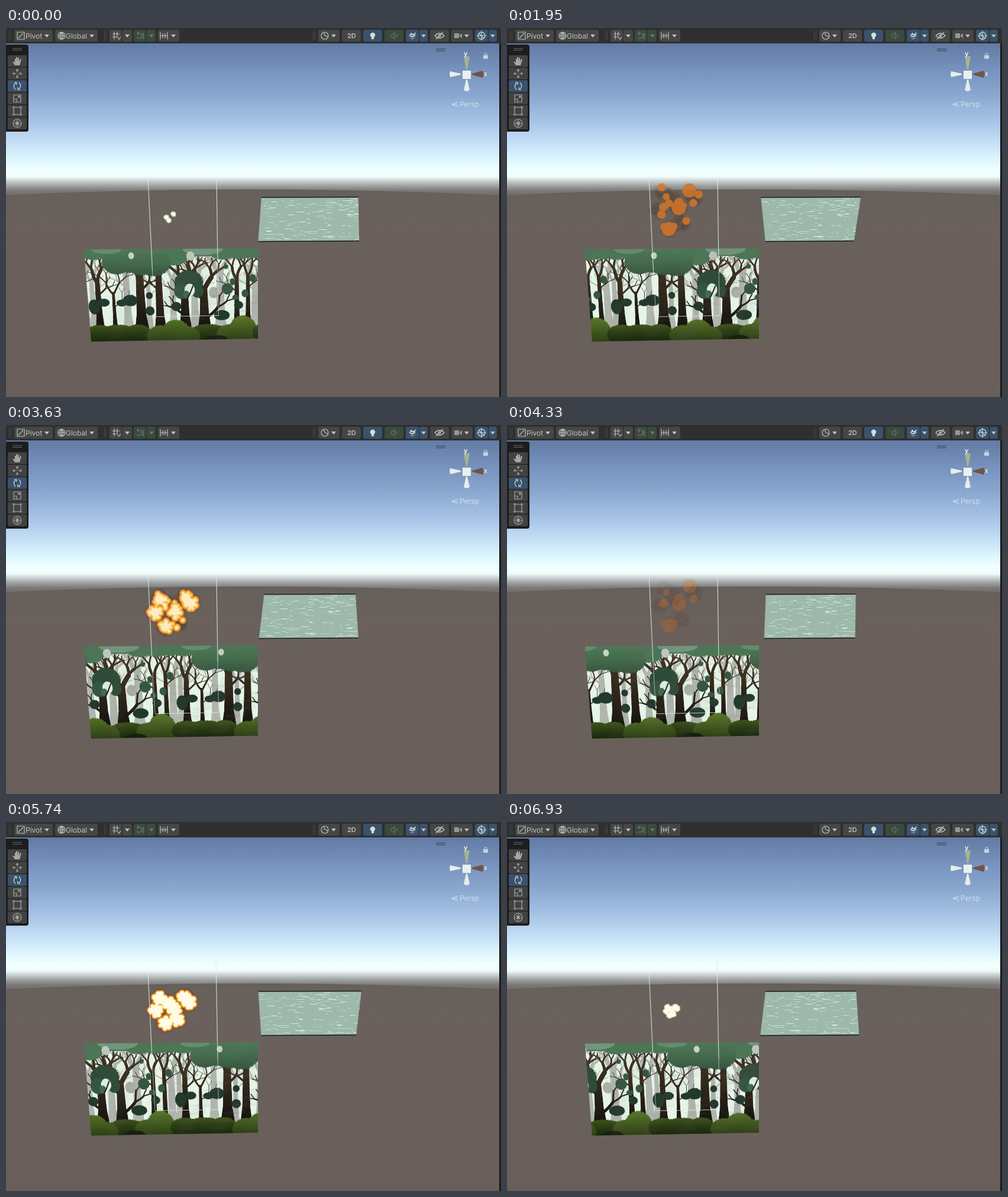
These frames come from a looping animation (837x623 px, 7000 ms). An HTML page with a canvas:

```html
<!DOCTYPE html>
<html lang="en">
<head>
<meta charset="utf-8">
<title>Scene view</title>
<style>
  html, body { margin: 0; width: 100%; height: 100%; overflow: hidden; background: #1f1f1f; }
  canvas { display: block; }
</style>
</head>
<body>
<canvas id="stage" width="837" height="623"></canvas>
<script>
const STEP = 70, STEPS = 100, LOOP = STEP * STEPS;
const BLAST = 2290, TAU = Math.PI * 2;
const TILE_W = 290, TILE_H = 155, SS = 2;
const stage = document.getElementById('stage').getContext('2d');

let seed = 1;
function rand() {
  seed = (seed * 1664525 + 1013904223) >>> 0;
  return seed / 4294967296;
}
const clamp = (v) => Math.max(0, Math.min(1, v));
const lerp = (a, b, k) => a + (b - a) * k;
const mix = (a, b, k) => `rgb(${a.map((v, i) => Math.round(lerp(v, b[i], k)))})`;

function makeCanvas(w, h) {
  const c = document.createElement('canvas');
  c.width = w;
  c.height = h;
  return c;
}
function gradient(c, y0, y1, stops) {
  const g = c.createLinearGradient(0, y0, 0, y1);
  stops.forEach(([y, color]) => g.addColorStop((y - y0) / (y1 - y0), color));
  return g;
}
function poly(c, color, points) {
  c.fillStyle = color;
  c.beginPath();
  points.forEach(([x, y]) => c.lineTo(x, y));
  c.closePath();
  c.fill();
}
function line(c, color, width, ...points) {
  c.strokeStyle = color;
  c.lineWidth = width;
  c.beginPath();
  points.forEach(([x, y]) => c.lineTo(x, y));
  c.stroke();
}

// ---------- editor frame and sky ----------
const INK = '#bcc4bc', BUTTON = '#464646', ACTIVE = '#3a526c', MUTED = '#3a4a3e';

function box(c, x, y, w, h, color, r = 3) {
  c.fillStyle = color;
  c.beginPath();
  c.roundRect(x, y, w, h, r);
  c.fill();
}
function icon(c, x, y, d, color = INK, fill = false) {
  c.save();
  c.translate(x, y);
  c.strokeStyle = c.fillStyle = color;
  c.lineWidth = 1.2;
  const path = new Path2D(d);
  fill ? c.fill(path) : c.stroke(path);
  c.restore();
}
const arrowDown = (c, x, color = INK) => icon(c, x, 13, 'M-4-2H4L0 3Z', color, true);
function label(c, text, x, y, font = '12px Inter, sans-serif', color = INK) {
  c.font = font;
  c.fillStyle = color;
  c.fillText(text, x, y);
}

function paintSky(c) {
  c.fillStyle = gradient(c, 26, 290, [[26, '#627ba4'], [70, '#7692bd'], [115, '#8ba8d0'], [155, '#a5c2e5'],
    [190, '#c1dcf4'], [220, '#dcf5fd'], [240, '#f0ffff'], [251, '#effcfb'], [257, '#cfd9d8'],
    [266, '#a0a4a3'], [275, '#7b7977'], [290, '#6a625e']]);
  c.fillRect(0, 26, 834, 264);
  c.fillStyle = gradient(c, 270, 623, [[270, '#645f5d'], [284, '#68605c'], [330, '#6a615c'], [623, '#685f5a']]);
  c.beginPath();
  c.moveTo(0, 282);
  c.quadraticCurveTo(410, 263, 834, 282);
  c.lineTo(834, 623);
  c.lineTo(0, 623);
  c.fill();
  c.fillStyle = '#1d1d1d';
  c.fillRect(834, 26, 3, 597);
}

function paintToolbar(c) {
  c.fillStyle = '#2f2f2f';
  c.fillRect(0, 0, 837, 26);
  [5, 166, 519].forEach((x) => {
    line(c, '#4a4a4a', 1, [x + .5, 5], [x + .5, 21]);
    line(c, '#4a4a4a', 1, [x + 3.5, 5], [x + 3.5, 21]);
  });
  [[14, 65], [83, 72], [175, 21], [197, 16], [216, 21, MUTED], [238, 15, MUTED], [257, 36], [528, 36],
    [568, 32], [604, 32, ACTIVE], [640, 32, MUTED], [676, 22, ACTIVE], [699, 14, ACTIVE], [717, 32],
    [753, 36], [793, 22, ACTIVE], [816, 14, ACTIVE]]
    .forEach(([x, w, color = BUTTON]) => box(c, x, 3, w, 20, color));
  [69, 145, 205, 283, 554, 706, 779, 823].forEach((x) => arrowDown(c, x));
  arrowDown(c, 246, '#6d776d');
  label(c, 'Pivot', 33, 17.5);
  label(c, 'Global', 101, 17.5);
  label(c, '2D', 577, 17, '600 11px Inter, sans-serif');

  icon(c, 25, 13, 'M-6-6H6V6H-6ZM-4 4L4-4');
  icon(c, 94, 13, 'M-6 0A6 6 0 1 0 6 0A6 6 0 1 0-6 0M-6 0H6M0-6V6M0-6Q-6 0 0 6M0-6Q6 0 0 6');
  icon(c, 186, 13, 'M-6-3H6M-6 2H2M-3-7V6M2-7V1M2 2L5 6L8 2');
  icon(c, 227, 13, 'M-6-4H-1M-6 4H-1M-1-4A4 4 0 0 1-1 4M-4-7V-1M5-5V6', '#748074');
  icon(c, 267, 13, 'M-6-6V6M6-6V6M-2-4V4M2-4V4M-6 0H6');
  icon(c, 539, 13, 'M-6 0A6 6 0 1 0 6 0A6 6 0 1 0-6 0M-1-5A5 5 0 0 0 5 1');
  icon(c, 620, 13, 'M-2 6V3Q-5 0-4-3Q0-8 4-3Q5 0 2 3V6Z', '#d4ddd5', true);
  icon(c, 656, 13, 'M-5-2H-3L1-5V5L-3 2H-5ZM3-2L6 2M6-2L3 2', '#667166');
  icon(c, 687, 13, 'M-6 0L0 3L6 0L4-1L0 1L-4-1ZM-6 3L0 6L6 3L0 5ZM-5-2L-1-5L1-2L6-6L4 0Z', '#d4ddd5', true);
  icon(c, 733, 13, 'M-8 0Q0-8 8 0Q0 8-8 0M-2 0A2 2 0 1 0 2 0A2 2 0 1 0-2 0M-6 6L6-6');
  icon(c, 764, 13, 'M-6-4H2V4H-6ZM3-1L7-4V4L3 1Z', '#929b92', true);
  icon(c, 804, 13, 'M-6 0A6 6 0 1 0 6 0A6 6 0 1 0-6 0M-8 0H8M0-8V8M-4-4Q0 2 4 4', '#d4ddd5');
}

function paintPalette(c) {
  box(c, -4, 28, 42, 147, '#1d1d1d', 4);
  [34.5, 37.5].forEach((y) => line(c, '#666', 1, [11, y], [27, y]));
  const tools = [
    'M-4 7L-8 1L-5 1L-4 3V-4H-2V0V-7H0V0L1-6H3V1L5-4L7-3L4 7Z',
    'M-7 0H-2M2 0H7M0-7V-2M0 2V7M-5-2L-7 0L-5 2M5-2L7 0L5 2M-2-5L0-7L2-5M-2 5L0 7L2 5',
    'M-3 6Q-9 0-2-6M-5-6H-1V-2M3-6Q9 0 2 6M5 6H1V2',
    'M-6-6H6V6H-6ZM-6 1H-1V6M1-1L4-4M1-4H4V-1',
    'M-4-6H4M-4 6H4M-6-4V4M6-4V4M-7-7H-5V-5H-7ZM5-7H7V-5H5ZM-7 5H-5V7H-7ZM5 5H7V7H5Z',
    'M-7 0A7 7 0 1 0 7 0A7 7 0 1 0-7 0M-6 0H6M0-6V6M-3-3L3 3M-3 3L3-3'];
  tools.forEach((d, i) => {
    box(c, 3, 46 + 21 * i, 32, 20, i === 2 ? ACTIVE : '#424242', 2);
    icon(c, 19, 56 + 21 * i, d, i === 2 ? '#d4ddd5' : '#a3aaa3', i === 0);
  });
}

function paintAxes(c) {
  [35.5, 38.5].forEach((y) => line(c, '#34404f', 1, [727, y], [743, y]));
  poly(c, '#a3b48f', [[774, 48], [784, 48], [780, 70], [778, 70]]);
  poly(c, '#e6eeea', [[778, 87], [780, 87], [784, 105], [779, 107], [774, 105]]);
  poly(c, '#e6eeea', [[769, 77], [769, 79], [751, 83], [750, 78], [751, 73]]);
  poly(c, '#745347', [[788, 77], [788, 79], [806, 84], [808, 78], [806, 72]]);
  poly(c, '#e9f1ee', [[772, 72], [786, 72], [786, 86], [772, 86]]);
  label(c, 'y', 774, 47, '600 11px Inter, sans-serif', '#f2f7f5');
  label(c, 'x', 808, 81, '600 10px Inter, sans-serif', '#e4ecea');
  box(c, 807, 46, 8, 6, '#c4d2dc', 1);
  icon(c, 811, 46, 'M-2 0V-2Q0-5 2-2V0', '#c4d2dc');
  icon(c, 759, 129, 'M5-4L-5 0L5 4M-5 0H5', '#cbdcec');
  label(c, 'Persp', 767, 133, '12px Inter, sans-serif', '#d0dfec');
}

// ---------- forest tile, two repeats wide ----------
function blob(c, x, y, rx, ry, color) {
  const n = Math.max(18, Math.round((rx + ry) * .9));
  poly(c, color, Array.from({ length: n * 2 }, (_, i) => {
    const a = i / n * Math.PI, r = i % 2 ? 1 : .9 + rand() * .06;
    return [x + Math.cos(a) * rx * r, y + Math.sin(a) * ry * r];
  }));
}
function limb(c, x, y, angle, len, width, depth) {
  const x2 = x + Math.sin(angle) * len, y2 = y - Math.cos(angle) * len;
  const bend = (rand() - .5) * len * .4;
  c.lineWidth = width;
  c.beginPath();
  c.moveTo(x, y);
  c.quadraticCurveTo((x + x2) / 2 + bend, (y + y2) / 2, x2, y2);
  c.stroke();
  if (!depth) return;
  [-1, 1].forEach((side) =>
    limb(c, x2, y2, angle * .8 + side * (.3 + rand() * .3), len * .72, width * .62, depth - 1));
}
function tree(c, x, fork, width, spread, color) {
  poly(c, color, [[x - width * .75, 140], [x - width * .48, 110], [x - width * .36, fork],
    [x + width * .36, fork], [x + width * .48, 110], [x + width * .75, 140]]);
  c.strokeStyle = color;
  c.lineCap = 'round';
  [-1, 1].forEach((side) => limb(c, x + side * width * .1, fork + 4, side * spread, 22, width * .5, 3));
  limb(c, x, fork + 26, (rand() < .5 ? -1 : 1) * .85, 18, width * .24, 2);
}

const LEAF_DARK = '#22382c', LEAF = '#345640';
const forestLayers = [
  (c) => [[8, 50, 10], [67, 40, 13], [104, 55, 9], [145, 46, 11], [182, 52, 13], [226, 40, 15], [285, 48, 13]]
    .forEach(([x, y, w]) => tree(c, x, y, w, .4, '#b0b5ae')),
  (c) => {
    const bark = gradient(c, 0, 140, [[0, '#44392a'], [60, '#352b1d'], [140, '#12110d']]);
    [[18, 52, 11, .3], [44, 72, 6, .5], [90, 44, 17, .3], [122, 44, 14, .35], [165, 58, 15, .4],
      [198, 64, 16, .55], [254, 48, 9, .3], [273, 42, 8, .3]].forEach((t) => tree(c, ...t, bark));
    c.strokeStyle = bark;
    limb(c, 205, 116, .8, 24, 5, 2);
    limb(c, 162, 112, -.9, 18, 4, 2);
  },
  (c) => {
    [[10, 97, 10, 13], [27, 90, 10, 7], [57, 91, 9, 6], [72, 87, 13, 10], [105, 79, 6, 6], [105, 105, 8, 8],
      [150, 98, 9, 8], [228, 114, 14, 9], [257, 97, 8, 7]].forEach((b) => blob(c, ...b, LEAF_DARK));
    [[238, 69, 10, 10], [268, 77, 6, 7], [281, 51, 6, 7], [236, 31, 4, 4], [247, 57, 5, 6], [252, 84, 6, 5]]
      .forEach((b) => blob(c, ...b, LEAF));
    blob(c, 173, 56, 25, 20, '#2f4b38');
    blob(c, 160, 72, 13, 14, '#345640');
    blob(c, 187, 72, 11, 12, '#2f4b38');
    blob(c, 174, 70, 9, 11, '#dcebe0');
    blob(c, 168, 78, 6, 7, '#426a50');
    line(c, '#241f17', 2, [165, 92], [174, 77], [180, 63]);
    blob(c, 215, 75, 9, 10, '#a9b0a9');
  },
  (c) => {
    c.fillStyle = gradient(c, 0, 22, [[0, '#5d8a67'], [22, '#47704f']]);
    c.fillRect(0, 0, TILE_W, 13);
    [[14, 7, 17, 11], [42, 8, 20, 11], [150, 9, 25, 20], [232, 7, 24, 12], [262, 7, 28, 11], [284, 7, 16, 10]]
      .forEach((b) => blob(c, ...b, '#4b7655'));
    const shade = gradient(c, 0, 48, [[0, '#4d7956'], [24, '#426a4b'], [48, '#34523d']]);
    [[52, 23, 25, 20], [80, 18, 40, 23], [115, 21, 30, 26], [94, 23, 26, 22]].forEach((b) => blob(c, ...b, shade));
    blob(c, 198, 0, 35, 11, '#6f967d');
    blob(c, 37, 0, 26, 8, '#638d6c');
    blob(c, 78, 11, 5, 6, '#c5d4ca');
    blob(c, 177, 12, 7, 8, '#bdc7bf');
  },
  (c) => {
    const light = gradient(c, 113, 155, [[113, '#5c7a2b'], [130, '#496321'], [155, '#2d4015']]);
    const dark = gradient(c, 124, 155, [[124, '#435b1d'], [140, '#2c3e14'], [155, '#1a270d']]);
    [[204, 146, 36, 18], [224, 146, 22, 14], [16, 144, 27, 17], [48, 143, 35, 16], [82, 144, 25, 17]]
      .forEach((b) => blob(c, ...b, dark));
    [[122, 149, 25, 20], [148, 143, 26, 23], [165, 149, 26, 18], [240, 147, 22, 18], [264, 141, 25, 27],
      [281, 149, 17, 18]].forEach((b) => blob(c, ...b, light));
    blob(c, 218, 156, 20, 8, '#171f0d');
  }
];

function paintForest() {
  const canvas = makeCanvas(TILE_W * 2 * SS, TILE_H * SS), c = canvas.getContext('2d');
  c.scale(SS, SS);
  c.fillStyle = '#e5f4e7';
  c.fillRect(0, 0, TILE_W * 2, TILE_H);
  forestLayers.forEach((paint, layer) => {
    for (let copy = -1; copy <= 2; copy++) {
      seed = 41 + layer;
      c.save();
      c.translate(copy * TILE_W, 0);
      paint(c);
      c.restore();
    }
  });
  return canvas;
}

function drawForest(time) {
  const offset = (time * .9564 % 1) * TILE_W * SS;
  for (let row = 0; row < TILE_H; row++) {
    const v = row / TILE_H, x = 132 + 12 * v, y = 374 + 155 * v, yRight = 372 + 152 * v;
    stage.setTransform((426 - x) / TILE_W, (yRight - y) / TILE_W, 0, 1, x, y);
    stage.drawImage(forest, offset, row * SS, TILE_W * SS, SS, 0, 0, TILE_W, 1.4);
  }
  stage.resetTransform();
}

// ---------- swaying water panel ----------
seed = 97;
const ripples = Array.from({ length: 150 }, () => ({
  u: rand(), v: .03 + rand() * .94, len: .015 + rand() ** 2 * .075, alpha: .35 + rand() * .6
}));

function drawWater(time) {
  const a = (112 * time - 97) * Math.PI / 180;
  const top = Math.cos(a) * 6, low = Math.sin(a) * 5.7;
  const tl = 432.5 + top, tr = 595 - top, bl = 432 + low, br = 591.5 - low;
  poly(stage, '#9cb9ac', [[tl, 286], [tr, 285.5], [br, 359.5], [bl, 360.5]]);
  ripples.forEach(({ u, v, len, alpha }) => {
    const from = (u - time * .05 + 1) % 1, to = Math.min(1, from + len);
    const left = lerp(tl, bl, v), right = lerp(tr, br, v), y = Math.round(286 + 74 * v) + .5;
    line(stage, `rgba(224,241,228,${alpha})`, 1, [lerp(left, right, from), y], [lerp(left, right, to), y]);
  });
  line(stage, '#171b18', 1.3, [tl, 286], [tr, 285.5]);
  line(stage, '#171b18', 1.3, [bl, 360.5], [br, 359.5]);
}

// ---------- explosion ----------
seed = 23;
const lobes = [[-24, -2], [25, -24], [-8, 20], [-17, -22], [8, -4], [33, -16], [12, 13], [0, -12]];
const puffs = lobes.flatMap(([x, y], lobe) => Array.from({ length: 9 }, (_, i) => {
  const a = i / 8 * TAU + rand() * .5, reach = i === 8 ? 0 : .62;
  return { x, y, lobe, dx: Math.cos(a) * reach, dy: Math.sin(a) * reach,
    size: i === 8 ? .75 : .3 + rand() * .18, heat: rand() };
}));

function drawBlast(p) {
  const grow = Math.min(p / 1280, 1.1) ** .55, radius = 14 * grow ** .85;
  const heat = clamp((p - 700) / 450), cool = clamp((p - 1350) / 450), fade = clamp((p - 1350) / 850);
  const cloud = puffs.filter((q) => q.lobe < 3 || p > 130).map((q) => ({
    x: 277 + q.x * grow + q.dx * radius + fade * 6,
    y: 320 + q.y * grow + q.dy * radius - fade * 24 * (.5 - q.y / 48),
    r: q.size * radius, heat: q.heat
  }));
  const layer = (color, extra, list) => {
    stage.fillStyle = color;
    stage.beginPath();
    list.forEach(({ x, y, r }) => {
      const size = Math.max(0, r + extra);
      stage.moveTo(x + size, y);
      stage.arc(x, y, size, 0, TAU);
    });
    stage.fill();
  };
  if (heat) {
    stage.globalAlpha = .2 * heat * Math.min(1, (1 - fade) * 4);
    cloud.forEach((q) => layer(q.y < 274 ? '#a3a684' : '#4d3527', 3 - fade * 2, [q]));
  }
  const burning = cloud.filter((q) => q.heat > fade * .92);
  stage.globalAlpha = Math.min(1, (1 - fade) * 5);
  layer(mix([158, 172, 143], [217, 120, 40], heat), .9, burning);
  if (cool < 1) {
    stage.globalAlpha = 1 - cool;
    layer(mix([250, 252, 245], [255, 205, 75], heat), -.3 - heat * .6, burning);
    layer('#fffbe6', -.8 - heat * 1.3 - cool * 6, burning);
  }
  stage.globalAlpha = 1;
}

function drawGuides(step) {
  const ink = 'rgba(226,236,228,.8)', faint = 'rgba(226,236,228,.6)';
  line(stage, ink, 1.2, [240, 252], [247.5, 410]);
  line(stage, faint, 1, [247.5, 410], [252, 487]);
  line(stage, ink, 1.2, step < 67 ? [356, 252] : [355, 233], [358, 400]);
  line(stage, faint, 1, [358, 400], [359.5, 486]);
  line(stage, ink, 1, [252, 487.5], [359.5, 485.5]);
}

const backdrop = makeCanvas(837, 623);
[paintSky, paintToolbar, paintPalette, paintAxes].forEach((paint) => paint(backdrop.getContext('2d')));
const forest = paintForest();

function render(now) {
  const step = Math.min(STEPS - 1, Math.floor((now % LOOP + 10) / STEP));
  const ms = step * STEP;
  stage.drawImage(backdrop, 0, 0);
  drawWater(ms / 1000);
  drawForest(ms / 1000);
  drawBlast((ms + 100) % BLAST);
  drawGuides(step);
}

const start = performance.now();
function tick() {
  render(performance.now() - start);
  requestAnimationFrame(tick);
}
tick();
</script>
</body>
</html>
```
